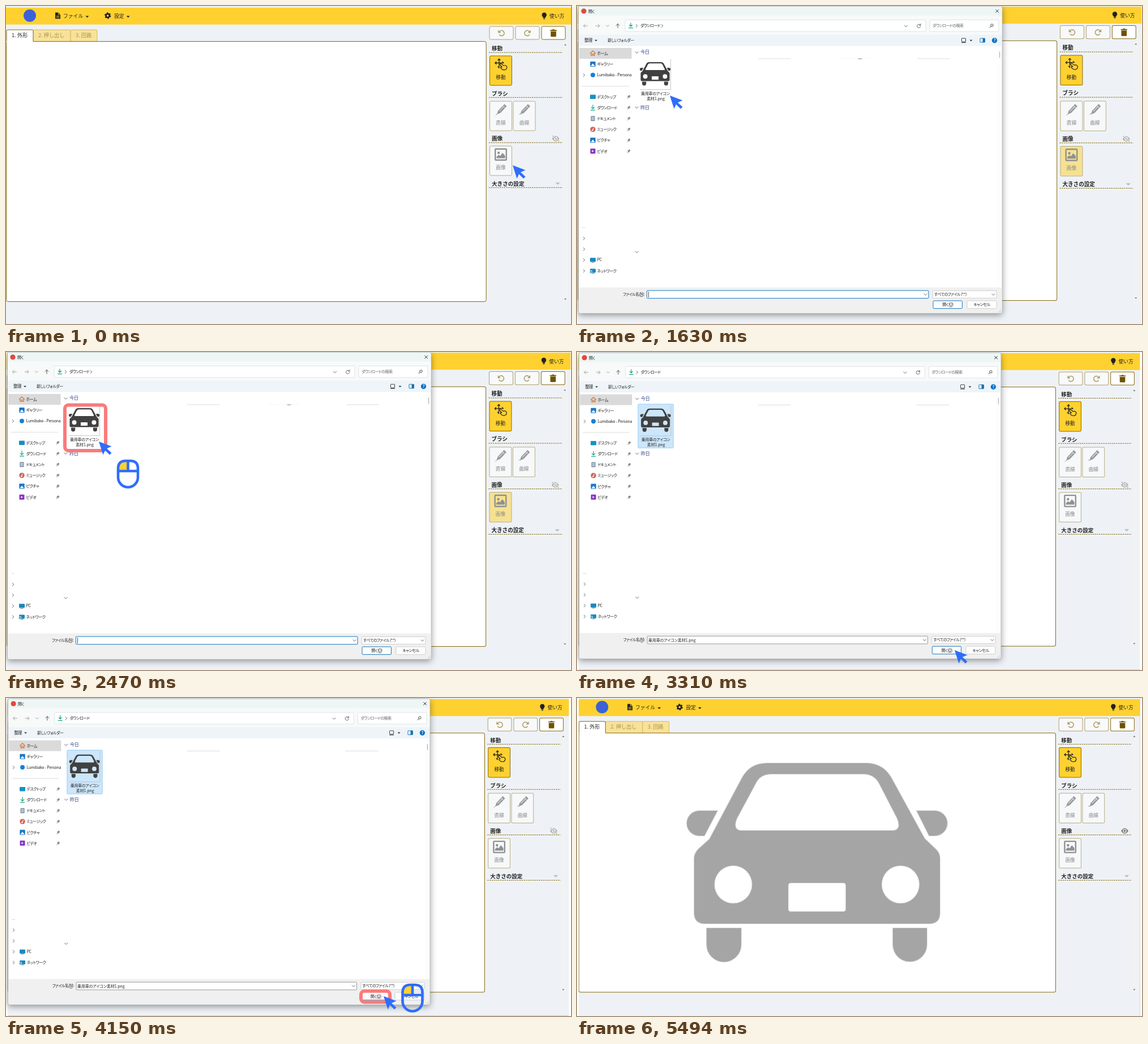
These frames come from a looping animation (998x561 px, 5830 ms). An HTML page:

```html
<!DOCTYPE html>
<html lang="ja">
<meta charset="utf-8">
<title>画像の読み込み</title>
<style>
  html, body { margin: 0; width: 100%; height: 100%; overflow: hidden; background: #fff; }
  svg { display: block; width: 998px; height: 561px; }
  text { font-family: "Noto Sans CJK JP", "Noto Sans CJK", "Noto Sans", sans-serif; fill: #222; white-space: pre; }
  #dialog text { letter-spacing: -.5px; font-feature-settings: "palt"; }
  #window { filter: drop-shadow(0 3px 6px #0006); }
  .bold { font-weight: 700; }
  .mid { text-anchor: middle; }
  .line { fill: none; stroke: #333; stroke-width: 1; stroke-linecap: round; stroke-linejoin: round; }
  .dim { opacity: .5; }
</style>
<svg viewBox="0 0 998 561"></svg>
<script>
const svg = document.querySelector('svg');
const GOLD = '#86690f', YELLOW = '#ffd130', BLUE = '#2f6dfb';

const text = (x, y, s, size = 7, attrs = '') =>
  `<text x="${x}" y="${y + size * .37}" font-size="${size}" ${attrs}>${s}</text>`;
const rect = (x, y, w, h, fill, stroke = 'none', r = 0, attrs = '') =>
  `<rect x="${x}" y="${y}" width="${w}" height="${h}" rx="${r}" fill="${fill}" stroke="${stroke}" ${attrs}/>`;
const circle = (x, y, r, fill, attrs = '') => `<circle cx="${x}" cy="${y}" r="${r}" fill="${fill}" ${attrs}/>`;
const shape = (d, fill = '#222', attrs = '') => `<path d="${d}" fill="${fill}" ${attrs}/>`;
const line = (d, stroke = '#333', width = 1) => `<path class="line" d="${d}" style="stroke:${stroke};stroke-width:${width}"/>`;
const at = (x, y, body, attrs = '') => `<g transform="translate(${x} ${y})" ${attrs}>${body}</g>`;
const on = (steps, body) => `<g data-on="${steps}">${body}</g>`;
const caret = (x, y, fill = '#222', w = 3) => shape(`M${x - w} ${y - w / 2}h${2 * w}l${-w} ${w}z`, fill);
const right = (x, y, c = '#555') => line(`M${x - 1.3} ${y - 2.5}l2.6 2.5l-2.6 2.5`, c, .9);
const down = (x, y, c = '#555') => line(`M${x - 2.6} ${y - 1.3}l2.6 2.6l2.6 -2.6`, c, .9);

const carPath = `M207 283V379Q207 398 226 398H622Q641 398 641 379V283Q641 274 634 267L614 248L558 146Q543 115 511 115H336
  Q305 115 291 142L234 249L214 267Q207 275 207 283Z
  M344 134H505Q525 134 534 151L566 213Q574 234 556 234H292Q274 234 282 213L317 148Q325 134 344 134Z
  M242.500 329a33.500 33.500 0 1 0 67 0a33.500 33.500 0 1 0 -67 0ZM538 329a33.500 33.500 0 1 0 67 0a33.500 33.500 0 1 0 -67 0Z
  M378 326H470Q475 326 475 331V372Q475 377 470 377H378Q373 377 373 372V331Q373 326 378 326Z
  M248 199H216a22 22 0 0 0 0 44H225ZM600 199H632a22 22 0 0 1 0 44H622Z
  M229 406H290V435a30.500 30.500 0 0 1 -61 0ZM558 406H618V435a30 30 0 0 1 -60 0Z`;
const car = (fill, attrs = '') => shape(carPath, fill, `fill-rule="evenodd" ${attrs}`);

const icons = {
  file: shape('M-4.500 -5.500h5.500l3.500 3.500v7.500h-9z') + line('M1 -5v3h3.500', YELLOW, .8) + line('M-2.500 .8h5M-2.500 3h5', YELLOW, .9),
  gear: circle(0, 0, 3.1, 'none', 'stroke="#222" stroke-width="2.6"') +
    circle(0, 0, 4.7, 'none', 'stroke="#222" stroke-width="2" stroke-dasharray="2.6 2.320"'),
  bulb: circle(0, -1.7, 4.2, '#222') + shape('M-2.200 1h4.400v2.500h-4.400zM-1.500 4.200h3v1.500h-3z'),
  turn: line('M-4 -1.500A4.700 4.700 0 1 1 -3.300 3.200', GOLD, 1.6) + shape('M-5.800 -5.500v5.300h5.300z', GOLD),
  trash: shape('M-5.700 -5.500h3.200l1 -1h3l1 1h3.200v1.700h-11.400zM-4.800 -3h9.600v8.300q0 1.200 -1.200 1.200h-7.200q-1.200 0 -1.200 -1.200z', '#6e5200'),
  move: line('M-3 -9.500V6M-10 -2.500H5M-5 -7.500l2 -2.200l2 2.200M-5 4l2 2.200M-8 -4.500l-2.200 2l2.200 2M3 -4.500l2 2', '#222', 1.3) +
    shape('M-1.500 -.5Q-.5 -2 1 -.8L5 2.200Q10 .5 10.800 5Q10.500 9.800 6 9.800Q1.500 9.500 -.5 5.500Q0 4 2.500 5L-1.200 1.500Z', YELLOW, 'stroke="#222" stroke-width="1.200"'),
  pencil: shape('M-7 8l2 -6L6.500 -10l4 4L-1 6z', '#444') + line('M-2.500 2.500L6 -6', '#ddd', 1) + line('M3.500 -7l4 4', '#fff', .8),
  picture: rect(-9.8, -9.8, 19.6, 19.6, 'none', '#333', 1, 'stroke-width="2.400"') + circle(-3.8, -3, 2.2, '#333') +
    shape('M-7.500 6.500V4l4 -3.500l2.500 2l4 -5.500l4.500 5V6.500z', '#333'),
  eye: shape('M-6.500 0Q0 -9.500 6.500 0Q0 9.500 -6.500 0z', '#7b7b70') + circle(0, 0, 3.3, '#eef2f6') + circle(0, 0, 1.9, '#7b7b70'),
  pin: line('M-2.500 3l2 -2.200M-2.200 -.8l3 3', '#777', .9) + shape('M-1.700 -.5l2.400 -2.700l2.400 2.400l-2.700 2.400z', '#888'),
};

function toolButton(x, y, label, icon, cls, fill = '#fff') {
  return `<g class="${cls}">` + rect(x, y, 39, 52, fill, GOLD, 2) + at(x + 19.5, y + 15, icon) +
    text(x + 19.5, y + 38, label, 8.7, 'class="mid"') + '</g>';
}
const section = (y, label) => text(858, y, label, 9.6, 'class="bold"') +
  `<path d="M853 ${y + 7.3}H983" stroke="${GOLD}" stroke-dasharray="2.500 1.300"/>`;
const topButton = (x, icon, alpha) =>
  `<g opacity="${alpha}">` + rect(x, 36, 42, 23, '#fff', GOLD, 2.5) + at(x + 21, 47.7, icon) + '</g>';
const tab = (x, w, label, active) => rect(x, 42, w, 21, active ? '#fff' : '#f8e29a', active ? GOLD : '#d3b95d', 2) +
  text(x + 9, 51.2, label, 9.2, active ? '' : 'style="fill:#a8924d"');

const app = `<g id="app">
  ${rect(0, 0, 998, 580, '#eef2f6')}${rect(0, 3, 998, 29.7, YELLOW)}
  ${circle(42, 17, 11, '#3b62d6')}
  ${at(91.5, 17, icons.file)}${text(101, 18, 'ファイル', 8.8)}${caret(143.5, 19)}
  ${at(179.7, 17, icons.gear)}${text(191, 18, '設定', 8.8)}${caret(215.7, 19)}
  ${at(950.7, 17.5, icons.bulb)}${text(960, 18, '使い方', 8.8)}
  ${tab(48, 66, '2. 押し出し')}${tab(114, 47, '3. 回路')}${tab(1, 47, '1. 外形', true)}
  ${rect(.7, 62.5, 847.5, 459, '#fff', GOLD, 3, 'id="canvas"')}${rect(1.5, 61, 46, 3, '#fff')}
  ${topButton(854, icons.turn, .6)}
  ${topButton(900, `<g transform="scale(-1 1)">${icons.turn}</g>`, .6)}
  ${topButton(946, icons.trash, 1)}
  ${rect(983.5, 64, 10, 458, '#f0f2f4')}
  ${shape('M986 69.500h4l-2 -2.500z', '#777')}${shape('M986 516h4l-2 2.500z', '#777', 'id="scrollEnd"')}
  ${section(74.7, '移動')}${toolButton(854.5, 88, '移動', icons.move, '', YELLOW)}
  ${section(154, 'ブラシ')}
  ${toolButton(854.5, 168, '直線', icons.pencil + line('M-9 10l3 -3', '#333', .9), 'dim')}
  ${toolButton(896, 168, '曲線', icons.pencil + line('M-9 8q2 -2 3 0', '#333', .9), 'dim')}
  ${section(233.7, '画像')}
  ${on('0 1 2 3 4 5', at(971, 234, icons.eye + line('M-5.500 -5L6 5', '#eef2f6', 2.6) + line('M-5.500 -5L6 5', '#7b7b70', 1.2), 'opacity=".550"'))}
  ${on('6', at(971, 234, icons.eye))}
  ${on('0 1 4 5 6', toolButton(854.5, 247, '画像', icons.picture, 'dim'))}
  ${on('2 3', toolButton(854.5, 247, '画像', icons.picture, 'dim', '#ffd130'))}
  ${section(313, '大きさの設定')}${caret(974.5, 313.5, '#b9bcbc', 4)}
</g>`;

// Sidebar entries: label, icon
const folders = [
  ['デスクトップ', rect(-5, -3.5, 10, 7.5, '#1591c4', 'none', 1)],
  ['ダウンロード', line('M0 -4.500V2M-2.700 -.5L0 2.200L2.700 -.5M-3.500 4.500h7', '#16a37f', 1.2)],
  ['ドキュメント', rect(-3.7, -4.5, 7.4, 9, '#8296ac', 'none', 1) + line('M-2 -2h4M-2 0h4M-2 2h4', '#fff', .8)],
  ['ミュージック', circle(0, 0, 4.7, '#cf6258') + circle(-.8, 1.6, 1.3, '#fff') + line('M.4 1.500V-2.300l1.500 .7', '#fff', .8)],
  ['ピクチャ', rect(-4.7, -4.5, 9.4, 9, '#1976c9', 'none', 1) + shape('M-3.700 3.500L0 -1l3.700 4.500z', '#fff')],
  ['ビデオ', rect(-4.5, -4.5, 9, 9, '#8633c2', 'none', 1) + shape('M-1.500 -2v4l3.300 -2z', '#fff')],
].map(([label, icon], i) => {
  const y = 160 + 19.2 * i;
  return at(28, y, icon) + text(35.5, y, label) + at(91.5, y, icons.pin);
}).join('');

const monitor = rect(-5, -4, 10, 7, '#1788c0', 'none', 1) + rect(-2.5, 3.5, 5, 1, '#55758a');
const fileName = '乗用車のアイコン素材1.png';
const dialog = `<g id="dialog" data-on="2 3 4 5">
  ${rect(2.5, .8, 748.5, 541.2, '#fff', '#a9b0b4', 3, 'id="window" stroke-width=".7"')}
  ${rect(3, 1, 747.5, 17, '#eef6f5', 'none', 3)}${rect(3, 17, 747.5, 33.5, '#f8fafa')}${rect(3, 50.5, 747.5, 20, '#eef4f8')}
  ${circle(12, 9, 4.6, '#e2483d')}${text(20, 9.2, '開く')}${line('M739.700 6.500l5 5m0 -5l-5 5')}
  ${line('M18.500 35h-7m3 -3l-3 3l3 3M33 35h7m-3 -3l3 3l-3 3', '#999', .9)}${down(54, 35, '#999')}
  ${line('M72 38.500v-7m-3 3l3 -3l3 3', '#444', .9)}
  ${rect(85, 24.5, 531, 20.5, '#fff', '#dfe3e5', 1)}${rect(623, 24.5, 122, 20.5, '#fff', '#dfe3e5', 1)}
  ${line('M95 30v6M92.500 33.500l2.500 2.700l2.500 -2.700M91.500 38.700h7', '#16a37f', 1.2)}
  ${right(105.5, 35)}${text(112, 34.7, 'ダウンロード')}${on('2 3', right(150.5, 35))}
  ${down(581, 35.5)}${line('M606.500 33.500a3.200 3.200 0 1 0 .5 2.500M607 31.500v2.500h-2.500', '#555', .9)}
  ${text(628, 34.7, 'ダウンロードの検索', 7, 'style="fill:#666"')}
  ${circle(733, 34, 2.2, 'none', 'stroke="#444"')}${line('M731.300 35.700l-2.300 2.300')}
  ${text(13, 60.5, '整理', 7.5)}${caret(33.5, 61, '#234', 2.5)}${text(54, 60.5, '新しいフォルダー')}
  ${rect(679.5, 57, 7, 6, '#fff', '#333', .5)}${line('M679.500 64.500h7')}${caret(696, 61, '#234', 2.5)}
  ${rect(712, 57, 8.5, 7, '#fff', '#1673b5', .5)}${rect(716.5, 57, 4, 7, '#1673b5')}
  ${circle(737.5, 60.7, 4.7, '#0a72c8')}${text(737.5, 60.7, '?', 7, 'class="mid bold" style="fill:#fff"')}
  ${rect(4, 74, 92.5, 19, '#dadada')}
  ${line('M23.500 83.500L28 79l4.500 4.500M25 83v4.500h2v-3h2v3h2V83', '#d07b43', 1.2)}${text(35.5, 83.4, 'ホーム')}
  ${at(28, 102.5, rect(-4.7, -4.5, 9.4, 9, '#1976c9', 'none', 1) + shape('M-3.700 3.500L0 -1l3.700 4.500z', '#fff'))}${text(35.5, 102.3, 'ギャラリー')}
  ${right(12.5, 122)}${circle(28, 121.7, 4, '#1680d4')}${text(35.5, 121.5, 'Lumibako - Persona', 7, 'style="letter-spacing:-.2px"')}
  ${rect(97, 112, 6, 20, '#fff')}${rect(9, 141, 83, .8, '#d5d5d5')}${folders}
  ${rect(9, 390.5, 6, .7, '#ccc')}${[410, 429, 448, 467.3].map(y => right(12.5, y)).join('')}
  ${at(28, 448.3, monitor)}${text(35.5, 447.8, 'PC')}
  ${at(28, 467.5, monitor + rect(-5.5, -1, 4, 5, '#68a8c9', '#fff', 0, 'stroke-width=".5"'))}${text(35.5, 467, 'ネットワーク')}
  ${down(105.5, 82)}${text(112, 81.3, '今日', 8.4, 'style="fill:#344b91"')}
  ${rect(320, 92.5, 58, .8, '#d5d5d5')}${rect(601, 92.5, 58, .8, '#d5d5d5')}
  ${on('2 3', rect(464, 92.5, 55, .5, '#eee') + shape('M495 92.700h10q-5 2.200 -10 0z', '#777'))}
  ${on('4 5', rect(107.2, 91.3, 62.5, 77.5, '#cce6fb', '#9bcdf0', 1))}
  ${line('M165.500 94v53.500h-54', '#b5bcc1', .8)}
  <g transform="translate(88 85.500) scale(.118)">${car('#414141')}</g>
  ${text(138.5, 154, '乗用車のアイコン', 7, 'class="mid" style="letter-spacing:-.25px"')}
  ${text(139, 163.2, '素材1.png', 7, 'class="mid" style="letter-spacing:-.1px"')}
  ${down(105.5, 179)}${text(112, 178.5, '昨日', 8.4, 'style="fill:#344b91"')}${down(105.5, 434)}
  ${rect(746, 80.5, 1.1, 11, '#777')}
  ${rect(3, 496.5, 747.5, 45, '#f0f0f0', 'none', 2)}${rect(742, 71, 8.5, 426, '#fbfbfb', 'none', 0, 'opacity=".400"')}
  ${text(81, 508.7, 'ファイル名(<tspan text-decoration="underline">N</tspan>):')}
  ${on('2 3', rect(123.5, 502, 497.5, 13.7, '#fff', '#1676c1', 1) + rect(126, 504, .8, 10, '#222'))}
  ${on('4 5', rect(123.5, 502, 497.5, 13.7, '#fff', '#9a9a9a', 1) + text(125.5, 508.8, fileName, 7, 'style="letter-spacing:-.1px"'))}
  ${down(615.5, 509)}${rect(628.5, 502.3, 112.5, 13, '#fff', '#cfcfcf', 1)}
  ${text(631, 508.7, 'すべてのファイル (*.*)')}${down(735.5, 509)}
  ${rect(629, 520, 51.5, 13.7, '#fdfdfd', '#1676c1', 1.5)}${text(655, 526.8, '開く(<tspan text-decoration="underline">O</tspan>)', 7, 'class="mid"')}
  ${rect(689, 520, 52, 13.7, '#fdfdfd', '#d0d0d0', 1.5)}${text(715, 526.8, 'キャンセル', 7, 'class="mid"')}
  ${line('M747 540.500l2.500 -2.500M744.500 540.500l5 -5', '#bbb', .7)}
</g>`;

const pointer = `<g id="pointer">${shape('M0 0L22.500 8.500L14 12.300L22.500 20L19 23.500L11 15.500L7.500 23.500Z', BLUE)}</g>`;
const mouse = `<g id="mouse">
  ${shape('M2.500 19.500V16Q2.500 2.500 16 2.500H20V19.500Z', YELLOW)}
  ${line('M2.500 16Q2.500 2.500 16 2.500H24Q37.500 2.500 37.500 16V31.500A17.500 17.500 0 0 1 2.500 31.500ZM2.500 20.500H37.500M20 2.500V20', BLUE, 4.6)}
</g>`;

svg.innerHTML = app +
  on('6', car('#a5a5a5', 'stroke="#dedede" stroke-width="2" paint-order="stroke"') + rect(0, 0, 3, 561, '#fff') + rect(994.3, 0, .7, 561, '#c5c9cc')) +
  on('4 5', rect(4, 560, 990, 1, '#c9cdd0')) + dialog +
  rect(0, 0, 0, 0, 'none', '#f97b7b', 6, 'id="frame" stroke-width="6"') + pointer + mouse;

const $ = id => document.getElementById(id);
const place = (id, [x, y]) => $(id).setAttribute('transform', `translate(${x} ${y})`);
const switched = [...svg.querySelectorAll('[data-on]')].map(el => [el, el.dataset.on.split(' ').map(Number)]);
const appViews = ['1 0 0 1 0 0', '.998 0 0 1.0095 1.2 -1.8', '.9937 0 0 1.007 2.6 -1.1', '.9937 0 0 1.007 2.6 -1.1'];
const pointers = [[895, 281], [164, 158], [667, 526]];
const mice = [[926, 312], [195.5, 189.5], [698, 503.5]];
const frames = [[852.5, 245, 44, 57], [104, 93.5, 72, 80.5], [627, 517, 51, 19.5]];

function show(step) {
  const pair = step >> 1, clicking = step % 2;
  for (const [el, steps] of switched) el.style.display = steps.includes(step) ? '' : 'none';
  $('app').setAttribute('transform', `matrix(${appViews[pair]})`);
  $('dialog').setAttribute('transform', pair === 2 ? 'matrix(.9955 0 0 .9965 1.2 1)' : '');
  $('canvas').setAttribute('height', pair ? 454 : 459);
  place('scrollEnd', [0, pair ? -5 : 0]);
  $('pointer').style.display = pair < 3 ? '' : 'none';
  $('mouse').style.display = $('frame').style.display = clicking ? '' : 'none';
  if (pair < 3) {
    place('pointer', pointers[pair]);
    place('mouse', mice[pair]);
    ['x', 'y', 'width', 'height'].forEach((key, i) => $('frame').setAttribute(key, frames[pair][i]));
  }
}

let current = -1;
function tick() {
  const t = performance.now() % 5830;
  const step = t < 790 ? 0 : 1 + Math.floor((t - 790) / 840);
  if (step !== current) show(current = step);
  requestAnimationFrame(tick);
}
tick();
</script>
</html>
```
